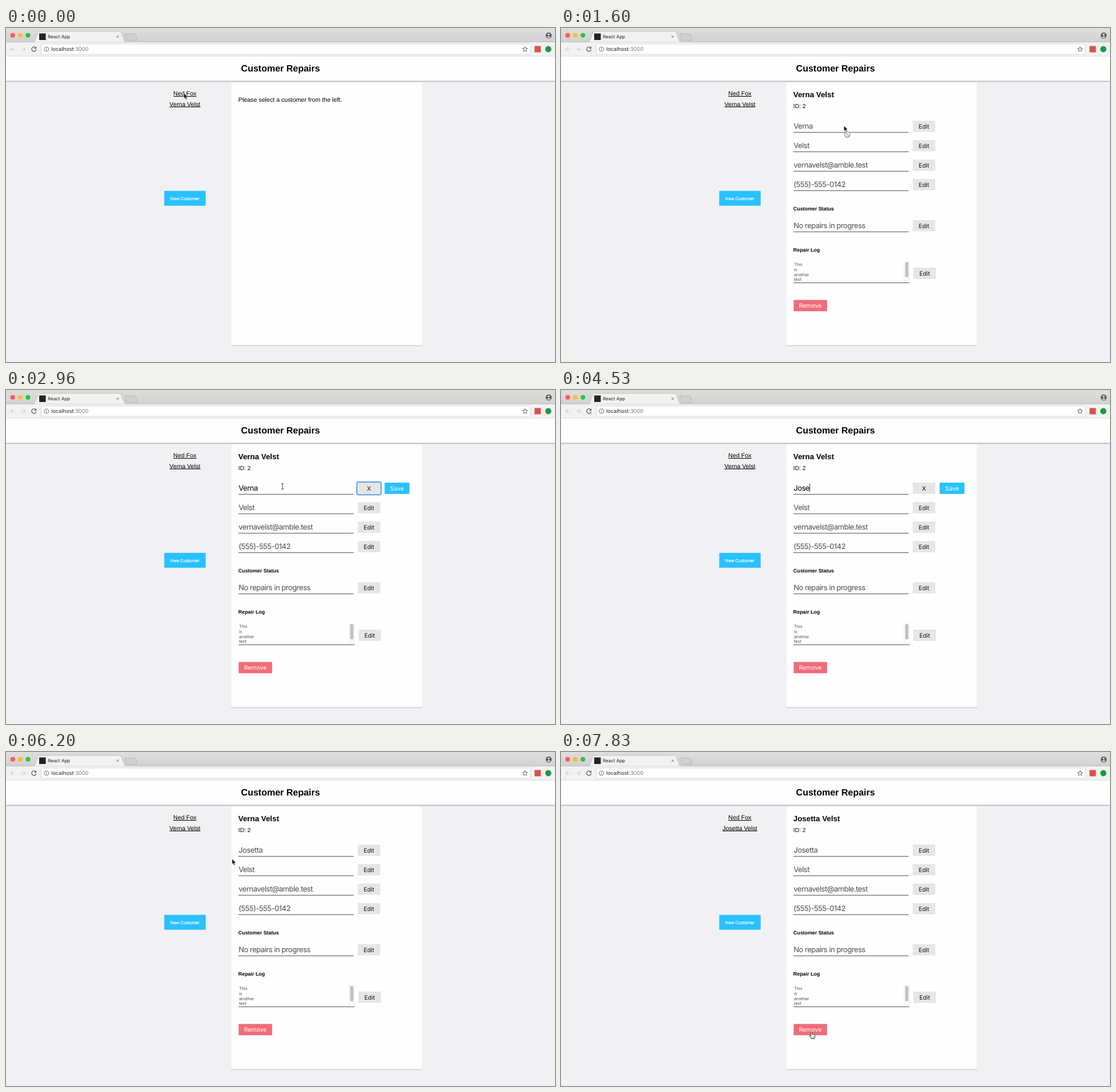
Animation, 959 px wide and 584 px high, one loop 8 s. Source, as an HTML page:

```html
<!DOCTYPE html>
<html lang="en">
<head>
<meta charset="utf-8">
<title>Customer Repairs</title>
<style>
  html, body { margin: 0; width: 100%; height: 100%; overflow: hidden; background: #f1f1f4; }
  svg { display: block; width: 959px; height: 584px; }
  text { font-family: "Liberation Sans", Arial, sans-serif; text-rendering: geometricPrecision; white-space: pre; }
  .ui, .field { font-family: Inter, sans-serif; }
  .field { font-size: 13px; letter-spacing: -.5px; fill: #4c4c4c; }
  .link { text-decoration: underline; text-decoration-skip-ink: none; }
</style>
</head>
<body>
<svg id="stage" viewBox="0 0 959 584">
  <defs>
    <linearGradient id="strip" x2="0" y2="1">
      <stop stop-color="#dedede"/><stop offset="1" stop-color="#d1d1d1"/>
    </linearGradient>
    <filter id="drop" x="-5%" y="-20%" width="110%" height="150%">
      <feDropShadow dx="0" dy="1" stdDeviation=".8" flood-opacity=".48"/>
    </filter>
    <filter id="soft" x="-5%" y="-5%" width="110%" height="110%">
      <feDropShadow dx="0" dy=".7" stdDeviation=".7" flood-opacity=".35"/>
    </filter>
    <filter id="lift" x="-50%" y="-50%" width="200%" height="200%">
      <feDropShadow dx="0" dy=".8" stdDeviation=".7" flood-opacity=".4"/>
    </filter>
  </defs>
</svg>
<script>
const LOOP = 8000;
const OLD = 'Verna', NEW = 'Josetta', LAST = 'Velst';
const LOAD = 1230, EDIT = 2500, FOCUS = 3130, SELECT = 3260, CLEAR = 4060;
const SAVE = 5760, SAVED = 5830, RENAMED = 6530;
const KEYS = [4130, 4230, 4400, 4530, 4600, 4700, 4800];
const ROWS = [162, 196, 230, 264, 336];
const BLUE = '#29c1ff', GREY = '#e6e6e6';

const stage = document.getElementById('stage');
function add(tag, attrs, parent = stage) {
  const el = document.createElementNS('http://www.w3.org/2000/svg', tag);
  for (const k in attrs) el.setAttribute(k, attrs[k]);
  parent.append(el);
  return el;
}
const group = (attrs = {}, parent) => add('g', attrs, parent);
const rect = (x, y, width, height, fill, parent, more) =>
  add('rect', { x, y, width, height, fill, ...more }, parent);
const dot = (cx, cy, r, fill, parent, more) => add('circle', { cx, cy, r, fill, ...more }, parent);
const line = (d, stroke, width = 1, parent) =>
  add('path', { d, stroke, 'stroke-width': width, fill: 'none' }, parent);
function text(str, x, y, size, parent, more) {
  const el = add('text', { x, y, 'font-size': size, ...more }, parent);
  el.textContent = str;
  return el;
}
const mid = { 'text-anchor': 'middle' };
const bold = { 'font-weight': 700 };
function button(label, x, y, w, fill, ink, parent) {
  const g = group({}, parent);
  rect(x + .4, y + .1, w - .6, 19.6, fill, g, { rx: 1 });
  text(label, x + w / 2, y + 13.8, 10.4, g, { ...mid, fill: ink, class: 'ui' });
  return g;
}
const show = (el, on) => el.style.display = on ? '' : 'none';
const put = (el, str) => { if (el.textContent !== str) el.textContent = str; };

function drawBrowser() {
  rect(0, 0, 959, 25, 'url(#strip)');
  line('M0 24.6H959', '#b9b9b9', .8);
  ['#fc5b57', '#fdbc2e', '#2ac440'].forEach((c, i) => dot(11.7 + 13.3 * i, 12.8, 4.1, c));
  add('path', { d: 'M47 25Q50 24 51 21L55.500 8Q56 6 58.500 6H198Q200.500 6 201.200 8L206 21Q207 24 210 25Z',
    fill: '#f2f2f2', stroke: '#b4b4b4', 'stroke-width': .7 });
  add('path', { d: 'M208 10.500H224.500Q226 10.500 226.500 12L229 20Q229.300 21.500 228 21.500H212Q210.500 21.500 210 20L207.300 12Q207 10.500 208 10.500Z',
    fill: '#d0d0d0', stroke: '#b2b2b2', 'stroke-width': .8 });
  rect(58, 9.5, 11.5, 11.5, '#20242b');
  text('React App', 73, 18, 8, stage, { class: 'ui', fill: '#222' });
  line('M193 13.300L197 17.300M197 13.300L193 17.300', '#666', .9);
  dot(948, 13, 5.2, '#5b5b5f');
  dot(948, 11.3, 1.7, '#e4e4e4');
  add('path', { d: 'M944.800 15.800Q948 12.600 951.200 15.800Q948 18.600 944.800 15.800Z', fill: '#e4e4e4' });

  rect(0, 25, 959, 25, '#f2f2f2');
  line('M16 37H8.500M12 33.300L8.300 37L12 40.700', '#d0d0d0', 1.1);
  line('M26 37H33.500M30 33.300L33.700 37L30 40.700', '#d0d0d0', 1.1);
  line('M52 34.500A4 4 0 1 0 52.700 38', '#555', 1.2);
  add('path', { d: 'M53 32.500V36.300H49.200Z', fill: '#555' });
  rect(61.5, 28, 854.5, 18, '#fff', stage, { rx: 2, stroke: '#d2d2d2', 'stroke-width': .8 });
  dot(70.7, 37, 4, 'none', stage, { stroke: '#666', 'stroke-width': .9 });
  line('M70.700 36.300V39.300M70.700 34.500V35.500', '#666', 1);
  const url = text('localhost', 79, 40.3, 9.2, stage, { class: 'ui', fill: '#222' });
  add('tspan', { fill: '#777' }, url).textContent = ':3000';
  let star = '';
  for (let i = 0; i < 10; i++) {
    const r = i % 2 ? 2 : 4.7, a = Math.PI * (i / 5 - .5);
    star += (i ? 'L' : 'M') + (906.7 + r * Math.cos(a)) + ' ' + (37.2 + r * Math.sin(a));
  }
  line(star + 'Z', '#555', .9);
  rect(923.3, 31.5, 11, 11, '#dc5247');
  dot(947.3, 37, 5.4, '#1d9a48');
}

function drawPage() {
  rect(0, 49, 959, 535, '#f1f1f4');
  rect(393.3, 95, 333.5, 459.7, '#fefefe', stage, { filter: 'url(#soft)' });
  rect(0, 49.5, 959, 42.7, '#fefefe', stage, { filter: 'url(#drop)' });
  line('M0 49.300H959', '#dedede', .7);
  text('Customer Repairs', 479.5, 76, 16, stage, { ...mid, ...bold });
  text('Ned Fox', 312.5, 118, 10.67, stage, { ...mid, class: 'link' });
  rect(276.4, 284.7, 72.4, 26.1, BLUE, stage, { rx: 1 });
  text('New Customer', 312.5, 301, 7.7, stage,
    { ...mid, fill: '#fff', stroke: '#fff', 'stroke-width': .2 });
}

drawBrowser();
drawPage();
const side = text('', 312.5, 136.5, 10.67, stage, { ...mid, class: 'link' });
const notice = text('', 405.8, 128.6, 10.67);

const card = group();
const heading = text('', 405.8, 120.7, 13.33, card, bold);
text('ID: 2', 405.8, 140, 10.2, card);
const selection = rect(406.5, 163, 35, 16, '#b3d7ff', card);
const values = [OLD, LAST, 'vernavelst@amble.test', '(555)-555-0142', 'No repairs in progress'];
const inputs = ROWS.map((y, i) => {
  line(`M406 ${y + 20.4}H607.300`, '#505050', 1, card);
  if (i) button('Edit', 614, y, 40, GREY, '#111', card);
  return text(values[i], 406.3, y + 13.9, 13, card, { class: 'field' });
});
const caret = rect(0, 163.5, .8, 15, '#000', card);
text('Customer Status', 405.8, 319, 8.89, card, bold);
text('Repair Log', 405.8, 391, 8.89, card, bold);
['This', 'is', 'another', 'test'].forEach((s, i) =>
  text(s, 407, 416.3 + 8.67 * i, 7.33, card, { class: 'ui', fill: '#4c4c4c' }));
rect(599, 407.5, 9.5, 37.5, '#fafafa', card);
line('M599.300 407.500V445M608.300 407.500V445', '#e6e6e6', .7, card);
rect(601.2, 409, 5.6, 27, '#c1c1c1', card, { rx: 2.8 });
line('M406 445.500H608.700', '#555', 1, card);
button('Edit', 615.3, 419, 40, GREY, '#111', card);
button('Remove', 406, 475.5, 59, '#f06c7a', '#fff', card);

const editBtn = button('Edit', 614, 162, 40, GREY, '#111', card);
const editing = group({}, card);
button('X', 614, 162, 40, GREY, '#111', editing);
button('Save', 661, 162, 44, BLUE, '#fff', editing);
const ring = (x, w) => {
  const g = group({ fill: 'none', stroke: '#6aa5f0' }, editing);
  rect(x - 1, 161, w + 2, 22, 'none', g, { rx: 2, 'stroke-width': 2 });
  rect(x - 2, 160, w + 4, 24, 'none', g, { rx: 3, 'stroke-width': 1, opacity: .5 });
  return g;
};
const ringX = ring(614, 40), ringSave = ring(661, 44);

// Each pointer shape is drawn around its hot spot.
const cursor = group();
const arrow = group({ filter: 'url(#lift)' }, cursor);
add('path', { d: 'M0 0V9.200L2.100 7.300L3.600 10.700L5.200 10L3.700 6.700H6.500Z',
  fill: '#000', stroke: '#fff', 'stroke-width': .6 }, arrow);
const noSign = group({}, arrow);
dot(5.8, 15, 4.7, '#fff', noSign, { 'fill-opacity': .7, stroke: '#aaa', 'stroke-width': 1.6 });
line('M2.500 11.700L9.100 18.300', '#aaa', 1.5, noSign);
const hand = group({ filter: 'url(#lift)' }, cursor);
add('path', { d: 'M-1 .3Q0 -1.100 1 .3V3.800Q2 2.800 3 4.100Q4.300 3.300 4.800 4.700Q6.200 4.300 6.300 6Q6.300 9 5 10.800H-.2Q-1.300 8.800-3.300 6.700Q-3.600 5.100-2 5.500L-1 6.500Z',
  fill: '#fff', stroke: '#222', 'stroke-width': .8 }, hand);
line('M.800 7V9.200M2.500 7V9.200M4.200 7V9.200', '#555', .5, hand);
const beam = group({}, cursor);
line('M-2-5Q0-5 0-3.500Q0-5 2-5M0-4V4M-2 5Q0 5 0 3.500Q0 5 2 5', '#222', .9, beam);

// time, x, y, shape held from that time on
const PATH = [
  [0, 311, 114, 'arrow'], [30, 311, 118, 'arrow'], [60, 311, 122, 'arrow'],
  [260, 311, 123, 'hand'], [360, 311, 134, 'arrow'], [400, 311, 138, 'arrow'],
  [730, 311, 138, 'arrow'], [960, 476, 177, 'arrow'], [1230, 476, 177, 'arrow'],
  [1900, 509, 166, 'arrow'], [2100, 510, 166, 'arrow'], [2420, 634, 170, 'arrow'],
  [2580, 634, 170, 'arrow'], [2680, 604, 169, 'beam'], [2900, 492, 168.5, 'beam'],
  [2930, 492, 168.5, 'beam'], [2960, 483, 168.5, 'beam'], [CLEAR, 483, 168.5, 'none'],
  [5030, 483, 168.5, 'beam'], [5190, 608, 169, 'arrow'], [5300, 672, 171, 'hand'],
  [5560, 672, 171, 'hand'], [5600, 680, 168, 'arrow'], [SAVED, 680, 168, 'arrow'],
  [6200, 395, 187, 'arrow'], [RENAMED, 395, 187, 'arrow'], [6830, 418, 200, 'arrow'],
  [7300, 446, 517, 'arrow'], [7430, 446, 517, 'arrow'], [7530, 438, 496, 'hand'],
  [7560, 437.5, 495, 'hand'], [7800, 437.5, 495, 'hand'], [7830, 437.5, 490, 'hand'],
  [LOOP, 437.5, 490, 'hand']
];
function pointer(t) {
  const i = PATH.findLastIndex(p => p[0] <= t);
  const a = PATH[i], b = PATH[i + 1] || a;
  const k = b === a ? 0 : (t - a[0]) / (b[0] - a[0]);
  return { x: a[1] + (b[1] - a[1]) * k, y: a[2] + (b[2] - a[2]) * k, shape: a[3] };
}

function render(t) {
  const within = (a, b) => t >= a && t < b;
  const edit = within(EDIT, SAVED), loaded = t >= LOAD;
  const name = (t < RENAMED ? OLD : NEW) + ' ' + LAST;
  put(side, name);
  put(heading, name);
  put(notice, t < 560 ? 'Please select a customer from the left.' : 'Fetching customer information..');
  show(notice, !loaded);
  show(card, loaded);

  put(inputs[0], t < CLEAR ? OLD : NEW.slice(0, KEYS.filter(k => k <= t).length));
  inputs[0].style.fill = edit ? '#000' : '';
  show(editBtn, !edit);
  show(editing, edit);
  show(ringX, t < FOCUS);
  show(ringSave, t >= SAVE);
  show(selection, within(SELECT, CLEAR));
  show(caret, within(FOCUS, SELECT) || within(CLEAR, SAVE));
  if (loaded) {
    const width = inputs[0].getComputedTextLength();
    caret.setAttribute('x', 406.6 + width);
    selection.setAttribute('width', width);
  }

  const p = pointer(t);
  const overInput = p.x > 406 && p.x < 608 &&
    (ROWS.some((y, i) => !(edit && !i) && p.y > y && p.y < y + 21) || (p.y > 407 && p.y < 446));
  cursor.setAttribute('transform', `translate(${p.x} ${p.y})`);
  show(arrow, p.shape === 'arrow');
  show(noSign, loaded && overInput);
  show(hand, p.shape === 'hand');
  show(beam, p.shape === 'beam');
}

const start = performance.now();
function tick() {
  render((performance.now() - start) % LOOP);
  requestAnimationFrame(tick);
}
tick();
</script>
</body>
</html>
```
